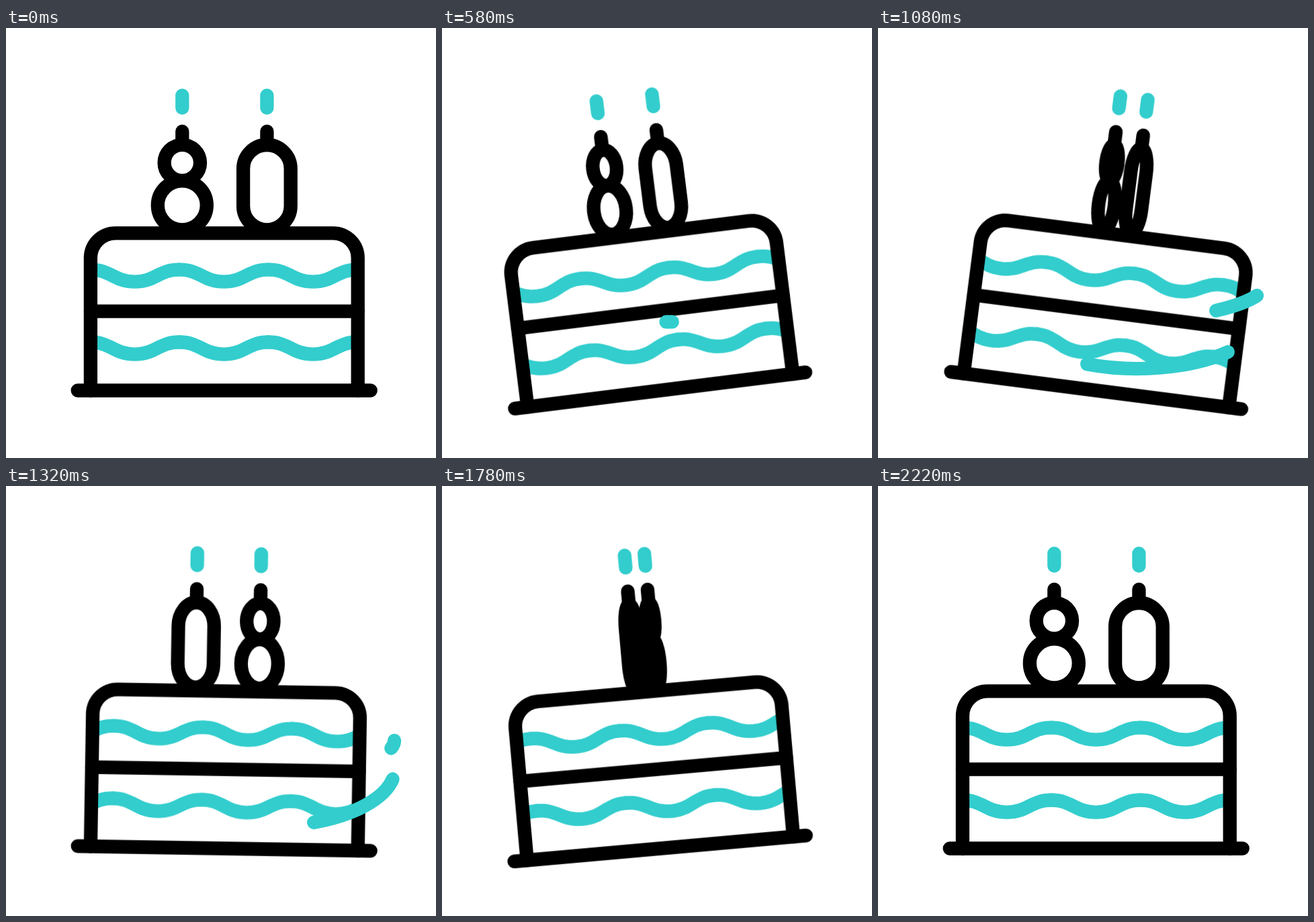
Write an HTML page without scripts that moves like this. It is 640 px wide and 640 px high and loops after 2.4 s.

```html
<!DOCTYPE html>
<html lang="en">
<head>
<meta charset="utf-8">
<title>Birthday cake</title>
<style>
  html, body { margin: 0; width: 100%; height: 100%; overflow: hidden; background: #fff; }
  svg { display: block; width: 100vw; height: 100vh; }

  .ink, .teal { fill: none; stroke-width: 20.3; stroke-linecap: round; }
  .ink { stroke: #000; }
  .teal { stroke: #33cdcd; }

  .cake, .candles, .waves, .streak { animation: 2.4s linear infinite; }
  .cake { transform-origin: 324.7px 539.5px; animation-name: rock; }
  .candles { transform-origin: 325.35px 0; animation-name: turn; }
  .candles * { vector-effect: non-scaling-stroke; }
  .waves { animation-name: flow; }
  .upper { animation-name: sweep-upper; }
  .lower { animation-name: sweep-lower; }

  @keyframes rock {
    0% { transform: rotate(0deg); }
    8.333% { transform: rotate(0deg); animation-timing-function: cubic-bezier(.4, 0, .67, 1); }
    24.167% { transform: rotate(-7.1deg); animation-timing-function: cubic-bezier(.29, 0, .69, 1); }
    42.917% { transform: rotate(7.6deg); animation-timing-function: cubic-bezier(.333, 0, .667, 1); }
    67.708% { transform: rotate(-6.2deg); animation-timing-function: cubic-bezier(.333, 0, .667, 1); }
    91.667%, 100% { transform: rotate(0deg); }
  }

  /* Negative values show the candles from behind. */
  @keyframes turn {
    0% { transform: scaleX(1); }
    8.333% { transform: scaleX(1); animation-timing-function: cubic-bezier(.6, 0, .85, 1); }
    24.167% { transform: scaleX(.66); animation-timing-function: cubic-bezier(.42, 0, .77, 1); }
    35.625% { transform: scaleX(1); animation-timing-function: cubic-bezier(.33, 0, .55, 1); }
    62.083% { transform: scaleX(-1); animation-timing-function: cubic-bezier(.22, 0, .785, 1); }
    91.667%, 100% { transform: scaleX(1); }
  }

  /* Back a little, then three whole wavelengths forward. */
  @keyframes flow {
    0%, 8.333% { transform: translateX(0); }
    24.167% { transform: translateX(-31px); }
    91.667%, 100% { transform: translateX(397.8px); }
  }

  /* Dash length sets the streak, dash offset its tail. */
  @keyframes sweep-upper {
    0%, 23.32% { visibility: hidden; stroke-dasharray: 0 999; stroke-dashoffset: 0; }
    23.33% { visibility: visible; stroke-dasharray: 0 999; stroke-dashoffset: 0; }
    31.667% { stroke-dasharray: 88 999; stroke-dashoffset: -83; }
    45% { stroke-dasharray: 65 999; stroke-dashoffset: -179; }
    51.667% { stroke-dasharray: 47 999; stroke-dashoffset: -222; }
    58.32% { visibility: visible; stroke-dasharray: 1 999; stroke-dashoffset: -290; }
    58.33%, 100% { visibility: hidden; stroke-dasharray: 0 999; stroke-dashoffset: -290; }
  }
  @keyframes sweep-lower {
    0%, 36.66% { visibility: hidden; stroke-dasharray: 0 999; stroke-dashoffset: 0; }
    36.67% { visibility: visible; stroke-dasharray: 0 999; stroke-dashoffset: 0; }
    45% { stroke-dasharray: 213 999; stroke-dashoffset: -11; }
    53.333% { stroke-dasharray: 160 999; stroke-dashoffset: -130; }
    58.333% { stroke-dasharray: 97 999; stroke-dashoffset: -215; }
    63.32% { visibility: visible; stroke-dasharray: 1 999; stroke-dashoffset: -330; }
    63.33%, 100% { visibility: hidden; stroke-dasharray: 0 999; stroke-dashoffset: -330; }
  }
</style>
</head>
<body>
<svg viewBox="0 0 640 640">
  <defs>
    <clipPath id="inside"><rect x="126" y="305" width="398" height="234"/></clipPath>
    <path id="swell" d="m0 0c30 0 36.3 18.1 66.3 18.1s36.3-18.1 66.3-18.1"/>
    <g id="pair"><use href="#swell"/><use href="#swell" x="132.6"/></g>
    <g id="four"><use href="#pair"/><use href="#pair" x="265.2"/></g>
    <g id="wave"><use href="#four" x="-405"/><use href="#four" x="125.4"/></g>
  </defs>

  <g class="cake">
    <g clip-path="url(#inside)">
      <g class="teal waves">
        <use href="#wave" y="359.6"/>
        <use href="#wave" y="467.5"/>
      </g>
    </g>

    <g class="candles">
      <g class="ink">
        <circle cx="262.3" cy="200.5" r="26.7"/>
        <circle cx="262.3" cy="263.8" r="36.5"/>
        <rect x="353.1" y="174" width="70.6" height="126.3" rx="35.3"/>
        <path d="M262.3 154v20M388.4 154v20"/>
      </g>
      <path class="teal" d="M262.3 100.5v18.3M388.4 100.5v18.3"/>
    </g>

    <g class="ink">
      <path d="M125.9 539.5V342.3a37 37 0 0 1 37-37H486.7a37 37 0 0 1 37 37V539.5"/>
      <path d="M125.9 421.7H523.7M106.7 539.5H542.7"/>
    </g>
  </g>

  <path class="teal streak upper" d="M325 437.5A253 58.5 0 0 0 578 379"/>
  <path class="teal streak lower" d="M300 497.9A193 87 0 0 0 579 420"/>
</svg>
</body>
</html>
```
